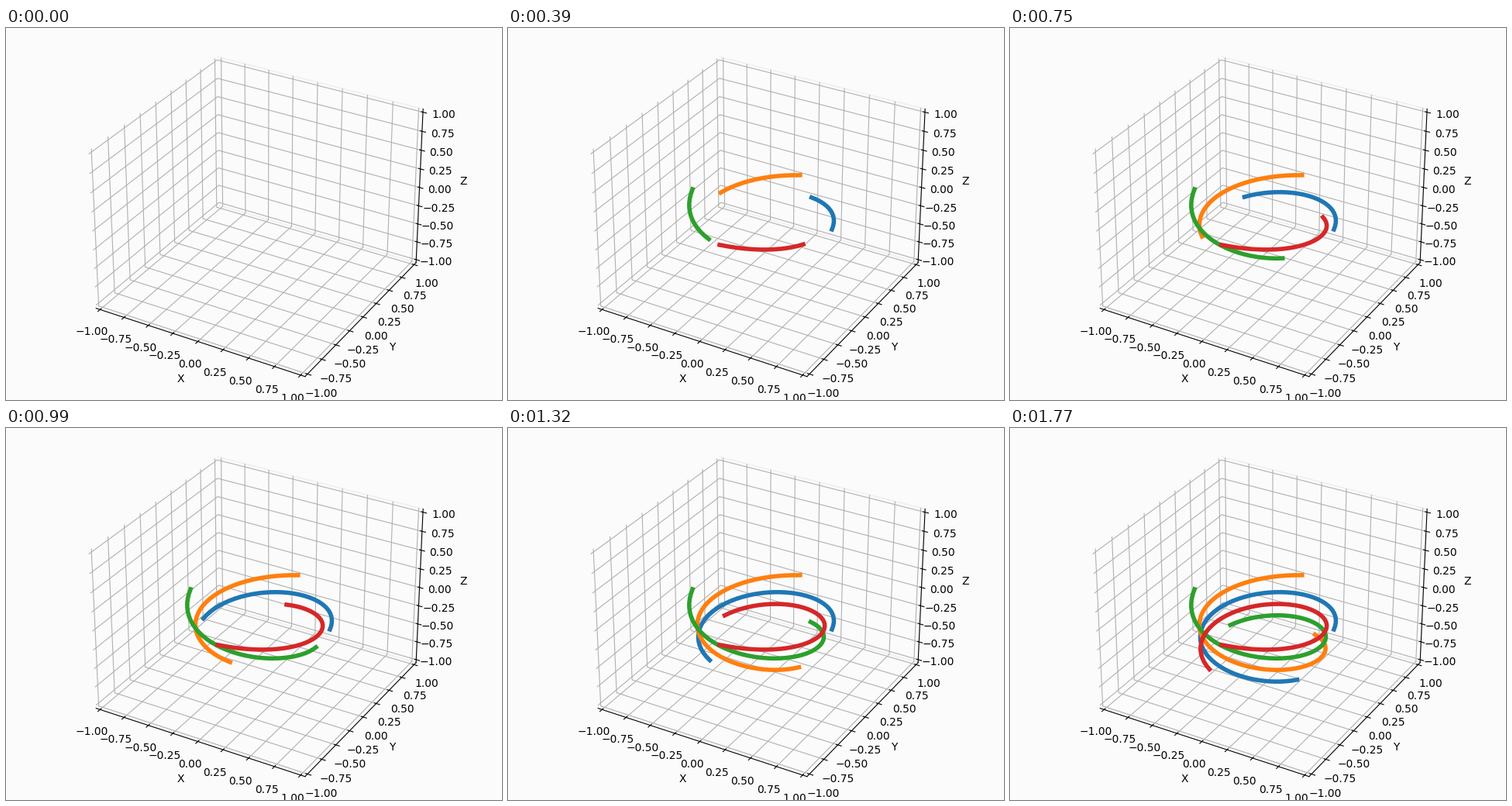
Write a matplotlib script that moves like this. It is 640 px wide and 480 px high and loops after 1800 ms.

```python
import numpy as np
import matplotlib.pyplot as plt
from matplotlib.animation import FuncAnimation

FRAMES = 60
INTERVAL = 30
BACKGROUND = "#fbfbfb"
LIMIT = 25 / 24  # small margin around the -1..1 ticks


def spiral(start):
    """Descending path that settles from radius 0.7 onto radius 0.55."""
    turn = 0.1 * np.arange(FRAMES)
    radius = 0.55 + 0.15 * np.exp(-1.5 * turn)
    return np.array([
        radius * np.cos(start + turn),
        radius * np.sin(start + turn),
        -0.1 * turn,
    ])


fig = plt.figure(figsize=(6.4, 4.8), dpi=100, facecolor=BACKGROUND)
ax = fig.add_axes((0, 0, 1, 1), projection="3d", facecolor=BACKGROUND)

paths = [spiral(quarter * np.pi / 2) for quarter in range(4)]
lines = [
    ax.plot(*path, color=f"C{i}", linewidth=4)[0]
    for i, path in enumerate(paths)
]

for axis in (ax.xaxis, ax.yaxis, ax.zaxis):
    axis.set_ticks(np.linspace(-1, 1, 9))
    axis.pane.set_alpha(None)
    axis.pane.set_facecolor("none")
    axis.pane.set_edgecolor("none")
ax.yaxis.pane.set_edgecolor((0.9, 0.9, 0.9, 0.6))

ax.set_xlim3d(-LIMIT, LIMIT)
ax.set_ylim3d(-LIMIT, LIMIT)
ax.set_zlim3d(-LIMIT, LIMIT)
ax.set_xlabel("X")
ax.set_ylabel("Y")
ax.set_zlabel("Z")
ax.view_init(elev=30, azim=-60)


def update(count):
    for line, path in zip(lines, paths):
        line.set_visible(count > 1)
        line.set_data_3d(*path[:, :max(count, 1)])
    return lines


anim = FuncAnimation(fig, update, frames=FRAMES, interval=INTERVAL,
                     repeat=True, repeat_delay=0, blit=False)
plt.show()
```
